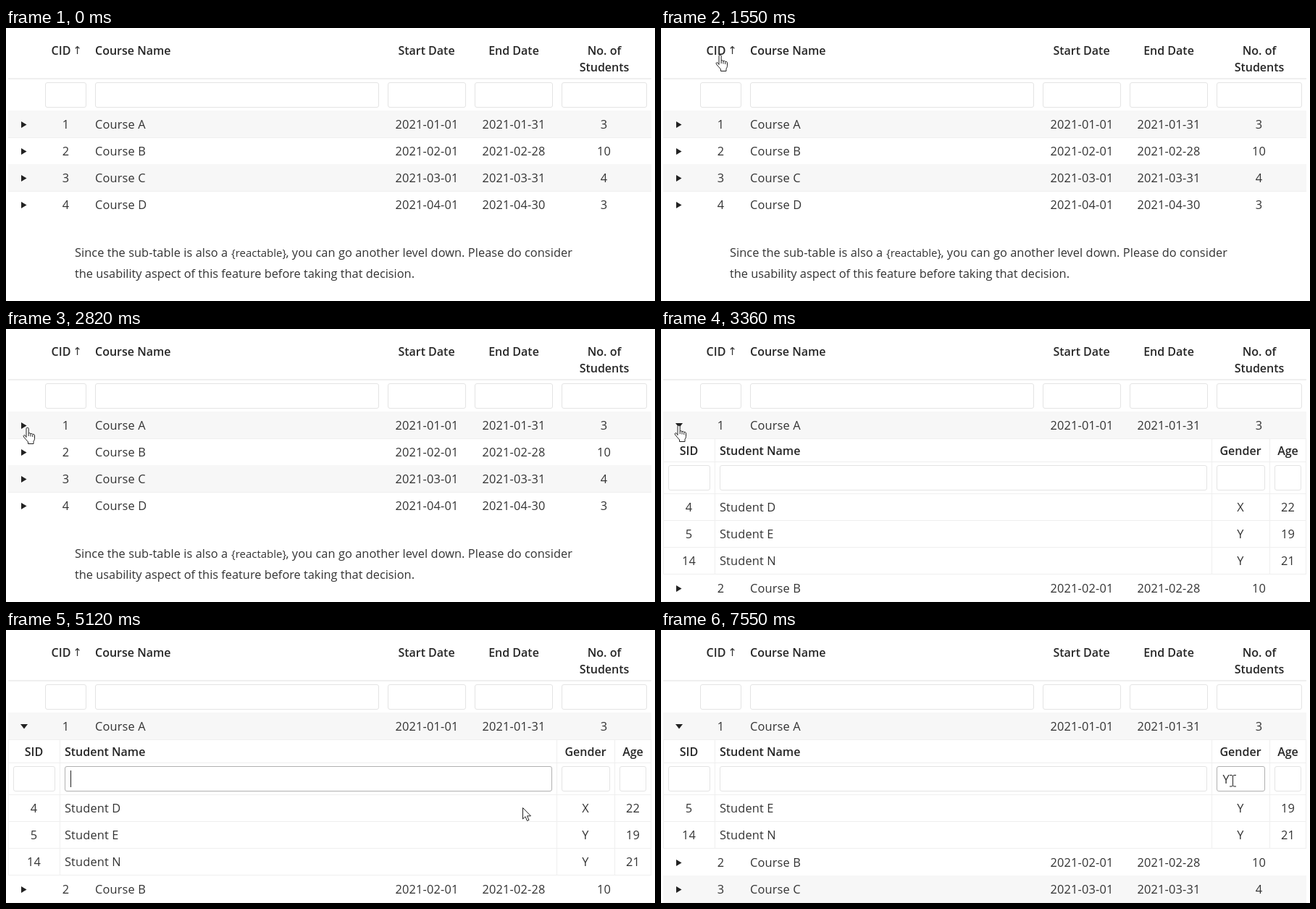
An HTML page that plays this animation: 896x377 px, repeating every 8000 ms.

```html
<!DOCTYPE html>
<html lang="en">
<head>
<meta charset="utf-8">
<title>Nested course table</title>
<style>
  html, body { margin: 0; width: 100%; height: 100%; overflow: hidden; background: #fff; }
  svg { display: block; width: 896px; height: 377px; }
  text { font: 16.35px "Open Sans", "Noto Sans", sans-serif; fill: #333; white-space: pre; }
  .b { font-size: 16px; font-weight: 600; fill: #262626; }
  .mid { text-anchor: middle; }
  .cell { letter-spacing: .15px; }
  .wide { letter-spacing: .06px; }
  .code { font-size: 15px; }
  .arrow { font: 15px "DejaVu Sans", sans-serif; }
  .input { fill: #fff; stroke: #e4e4e4; }
  .active { stroke: #b0b0b0; }
  .line { fill: #efefef; }
  .cursor { fill: #fff; stroke: #222; stroke-linejoin: round; }
</style>
</head>
<body>
<svg id="stage" viewBox="0 0 896 377"></svg>
<script>
const LOOP = 8000, ROW = 37;
const stage = document.getElementById('stage');

const courses = [
  [1, 'Course A', '2021-01-01', '2021-01-31', 3],
  [2, 'Course B', '2021-02-01', '2021-02-28', 10],
  [3, 'Course C', '2021-03-01', '2021-03-31', 4],
  [4, 'Course D', '2021-04-01', '2021-04-30', 3]
];
const students = [
  [4, 'Student D', 'X', 22],
  [5, 'Student E', 'Y', 19],
  [14, 'Student N', 'Y', 21]
];

// Column positions: the name column is left-aligned, the others centred
const courseX = [82.5, 123, 581, 701, 825.5];
const studentX = [38.5, 81, 800, 865.5];
const courseInputs = [[54, 111], [123, 515], [527, 635], [647, 755], [767, 885]];
const studentInputs = [[10, 68], [81, 754], [767, 834], [847, 884]];

// Pointer samples, each held until the next: time, hot spot, shape
const pointer = [
  [100, 200, 290, 'arrow'], [210, 150, 180, 'arrow'], [320, 100, 62, 'hand'],
  [430, 84, 37, 'hand'], [550, 82, 37, 'hand'],
  [1900, 96, 50, 'hand'], [2010, 126, 94, 'beam'], [2220, 110, 145, 'arrow'],
  [2330, 92, 146, 'arrow'], [2440, 73, 145, 'arrow'], [2560, 55, 143, 'arrow'],
  [2680, 41, 140, 'hand'], [2790, 30, 136, 'hand'], [2910, 25, 133, 'hand'],
  [3470, 90, 178, 'arrow'], [3580, 170, 208, 'beam'],
  [4910, 340, 214, 'beam'], [5010, 560, 234, 'arrow'], [5120, 713, 245, 'arrow'],
  [5230, 825, 252, 'arrow'], [5330, 884, 248, 'arrow'], [5440, 850, 232, 'arrow'],
  [5550, 805, 213, 'beam'], [5660, 789, 208, 'beam']
];
const shapes = {
  arrow: 'M.5 .5V16L4 12.7 6.5 18.5 9 17.4 6.5 11.8H11.5Z',
  hand: 'M-2 13.5V1.8a1.6 1.6 0 0 1 3.2 0V8q1.6-1 2.8.6 1.7-.8 2.8.7 2.4-.5 2.7 1.5v4.5q0 2-1.5 4V22.5H.5V20Q-3 16-5.5 13q-1-2 .5-2.5 1.3-.2 3 3zM1.2 8v4M4 9v3.5M6.8 10v3',
  beam: 'M-4 -7.5H-1L.5 -6.5 2 -7.5H5M.5 -6.5V7M-4 8H-1L.5 7 2 8H5'
};

const text = (s, x, y, cls = '') => `<text class="${cls}" x="${x}" y="${y}">${s}</text>`;
const box = (x, y, w, h, cls) => `<rect class="${cls}" x="${x}" y="${y}" width="${w}" height="${h}"/>`;
const hline = (y, h = 1) => box(3, y, 888, h, 'line');
const cells = (row, xs, y, cls = 'cell') =>
  row.map((s, i) => text(s, xs[i], y, cls + (i === 1 ? '' : ' mid'))).join('');
const inputs = (spans, y, active) => spans.map(([a, b], i) =>
  `<rect class="input${i === active ? ' active' : ''}" x="${a + .5}" y="${y + .5}" width="${b - a - 1}" height="34" rx="2.5"/>`).join('');
const caret = x => `<path d="M${x}.5 194V217" stroke="#222"/>`;
const between = (t, a, b) => t >= a && t < b;

function header(t, descending) {
  return text('CID', 76, 37, 'b mid') + text(descending ? '↓' : '↑', 98.5, 36, 'arrow mid') +
    text('Course Name', 123, 37, 'b') + text('Start Date', 580.5, 37, 'b mid') +
    text('End Date', 701, 37, 'b mid') + text('No. of', 826, 37, 'b mid') +
    text('Students', 826, 60, 'b mid') + hline(69, 2) +
    inputs(courseInputs, 75, between(t, 2010, 2330) ? 1 : -1);
}

function courseRow(row, y, striped, open, last) {
  const mark = open ? 'M20 130H30L25 136.5Z' : 'M21 129L28.5 133.5 21 138Z';
  return (striped ? `<rect x="3" y="${y}" width="888" height="${ROW}" fill="#f7f7f7"/>` : '') +
    (last ? '' : hline(y + ROW)) +
    `<path d="${mark}" transform="translate(0 ${y - 114})" fill="#222"/>` +
    cells(row, courseX, y + 25);
}

function subTable(t, rows) {
  const bottom = 227 + rows.length * ROW;
  const focus = between(t, 3580, 5800) ? 1 : t >= 5800 ? 2 : -1;
  let out = cells(['SID', 'Student Name', 'Gender', 'Age'], studentX, 174, 'b') +
    hline(151) + hline(183) + hline(227) + inputs(studentInputs, 188, focus);
  for (const x of [3, 74, 760, 840, 890]) out += box(x, 151, 1, bottom - 150, 'line');
  rows.forEach((row, i) => {
    out += hline(264 + i * ROW) + cells(row, studentX, 252 + i * ROW);
  });
  if (between(t, 4010, 4570) || between(t, 5120, 5660)) out += caret(89);
  if (between(t, 5800, 6450)) out += caret(776);
  if (t >= 7000) out += text('Y', 775.5, 212);
  if (between(t, 7000, 7550)) out += caret(786);
  return out;
}

function note(y) {
  return text('Since the sub-table is also a', 95, y, 'wide') + text('{reactable}', 311, y, 'code') +
    text(', you can go another level down. Please do consider', 386.5, y, 'wide') +
    text('the usability aspect of this feature before taking that decision.', 95, y + 29);
}

function cursor(t) {
  const now = pointer.filter(p => p[0] <= t).pop();
  if (!now) return '';
  const [, x, y, shape] = now;
  return `<path class="cursor" d="${shapes[shape]}" transform="translate(${x} ${y})"/>`;
}

function draw(t) {
  const descending = between(t, 650, 1550), open = t >= 3130;
  const rows = descending ? [...courses].reverse() : courses;
  const visible = t >= 7000 ? students.filter(s => s[2] === 'Y') : students;
  let y = 114, out = header(t, descending);
  rows.forEach((row, i) => {
    const expanded = open && i === 0;
    out += courseRow(row, y, i % 2 === 0, expanded, i === rows.length - 1);
    y += ROW;
    if (expanded) {
      out += subTable(t, visible);
      y += 77 + visible.length * ROW;
    }
  });
  return out + note(y + 54) + cursor(t);
}

let shown = '';
function frame() {
  const picture = draw(performance.now() % LOOP);
  if (picture !== shown) stage.innerHTML = shown = picture;
  requestAnimationFrame(frame);
}
frame();
</script>
</body>
</html>
```
